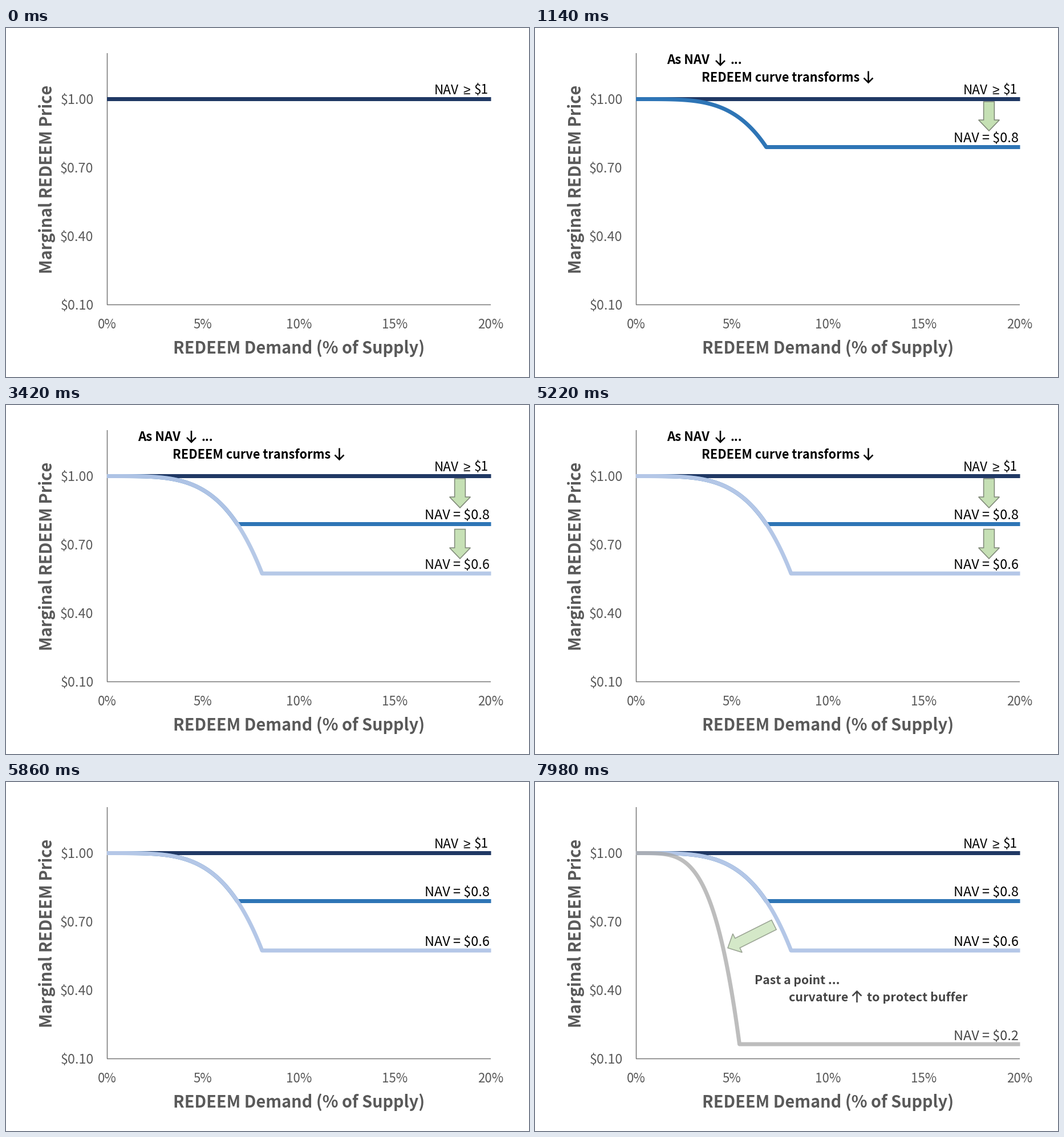
Recreate the animation shown at these times as a matplotlib script. Size 917 px wide and 611 px high, loop 8000 ms.

```python
import numpy as np
import matplotlib.pyplot as plt
from matplotlib.animation import FuncAnimation
from matplotlib.patches import PathPatch, Polygon
from matplotlib.path import Path

W, H, DPI = 917, 611, 100
LOOP, TICK = 8000, 20
PT = 72 / DPI  # points per pixel
LEFT, RIGHT, TOP, BOTTOM = 177, 850.5, 44, 484.5
PAR = 124.5  # height of the $1.00 line
GREY = "#595959"
FONT = ["Noto Sans CJK JP", "Liberation Sans"]

fig = plt.figure(figsize=(W / DPI, H / DPI), dpi=DPI, facecolor="white")
ax = fig.add_axes([0, 0, 1, 1])
ax.set_xlim(0, W)
ax.set_ylim(H, 0)
ax.axis("off")


def label(x, y, text, size, color="black", ha="left", bold=False, font=FONT, **kw):
    return ax.text(x, y, text, fontsize=size * PT, color=color, ha=ha,
                   va="baseline", family=font, parse_math=False,
                   weight="bold" if bold else "normal", **kw)


def line(x, y, color, width, z):
    return ax.plot(x, y, color=color, lw=width * PT, zorder=z, snap=False,
                   solid_capstyle="butt", solid_joinstyle="round")[0]


def curve(knee, floor, color, z):
    """Quartic-like fall from par to the floor, then flat."""
    x = np.linspace(LEFT, knee, 80)
    y = PAR + (floor - PAR) * ((x - LEFT) / (knee - LEFT)) ** 4.07
    return line(np.append(x, RIGHT), np.append(y, floor), color, 7, z)


def block_arrow(tail, tip):
    tail, tip = np.array(tail, float), np.array(tip, float)
    along = (tip - tail) / np.hypot(*(tip - tail))
    side = np.array([-along[1], along[0]])
    neck = tip - 19 * along
    pts = [tail + 9.4 * side, neck + 9.4 * side, neck + 18.3 * side, tip,
           neck - 18.3 * side, neck - 9.4 * side, tail - 9.4 * side]
    return ax.add_patch(Polygon(pts, fc="#C5E0B4", ec="#7F8878",
                                lw=1.6 * PT, zorder=8, snap=False))


def text_arrow(x, start, tip):
    back = tip - 8 * np.sign(tip - start)
    pts = [(x, start), (x, tip), (x - 8, back), (x, tip), (x + 8, back)]
    codes = [Path.MOVETO, Path.LINETO, Path.MOVETO, Path.LINETO, Path.LINETO]
    return ax.add_patch(PathPatch(Path(pts, codes), fc="none", ec="black",
                                  lw=2.6 * PT, joinstyle="miter", zorder=8,
                                  snap=False))


# Axes, ticks and titles
line([LEFT + .5, LEFT + .5], [TOP, BOTTOM], "#767676", 1.5, 1)
line([LEFT, RIGHT - .5], [BOTTOM, BOTTOM], "#767676", 1.5, 1)
for i, price in enumerate(("$1.00", "$0.70", "$0.40", "$0.10")):
    label(153.5, 133 + 120 * i, price, 23.4, GREY, "right")
for i in range(5):
    label(177 + 168.2 * i, 526, f"{5 * i}%", 22.3, GREY, "center")
label(513.5, 569.5, "REDEEM Demand (% of Supply)", 28.9, GREY, "center", True)
label(81.5, 264.5, "Marginal REDEEM Price", 29, GREY, "center", True,
      rotation=90, rotation_mode="anchor")

# Par line
line([LEFT, RIGHT], [PAR, PAR], "#203864", 7, 2)
label(751, 115.5, "NAV", 22.6)
label(807.5, 115.5, "≥", 22.6, ha="center", font=["Liberation Sans"])
label(846, 115.5, "$1", 22.6, ha="right")


def nav(y, value):
    return label(848, y, f"NAV = {value}", 23.5, ha="right")


heading = [
    label(231, 63, "As NAV", 22.3, bold=True),
    text_arrow(325, 45, 65),
    label(342, 63, "...", 21.4, bold=True),
    label(291.5, 93.7, "REDEEM curve transforms", 21.6, bold=True),
    text_arrow(584.5, 75.5, 95.5),
]
first_arrow = block_arrow((796, 129), (796, 180))
second_arrow = block_arrow((796, 217.5), (796, 269))
first = [curve(405.5, 208.5, "#2E75B6", 3), nav(200.3, "$0.8")]
second = [curve(449, 295, "#B4C7E7", 4), nav(287.3, "$0.6")]
third = [
    curve(358.5, 459, "#A5A5A5", 5),
    nav(451.7, "$0.2"),
    block_arrow((419, 250), (338, 290.5)),
    label(385, 353.7, "Past a point ...", 21.2, bold=True),
    label(445.5, 384, "curvature", 21.4, bold=True),
    text_arrow(564.5, 386, 366.5),
    label(582, 384, "to protect buffer", 21.4, bold=True),
]


def fade(ms, start):
    """Eased 0..1 in 17 steps of 40 ms."""
    step = (ms - start) // 40
    if step < 0:
        return 0.0
    u = min((step + 1.5) / 17.5, 1.0)
    return u * u * (3 - 2 * u)


def show(artists, alpha):
    for a in artists:
        a.set_visible(alpha > 0)
        a.set_alpha(alpha)


def update(i):
    ms = i * TICK
    a, b, out, c = (fade(ms, t) for t in (500, 2860, 5220, 7580))
    show(first, a)
    show(second, b)
    show(third, c)
    show(heading + [first_arrow], a * (1 - out))
    show([second_arrow], b * (1 - out))
    return []


anim = FuncAnimation(fig, update, frames=LOOP // TICK, interval=TICK,
                     init_func=lambda: update(0), repeat=True,
                     repeat_delay=0, blit=False)
plt.show()
```
